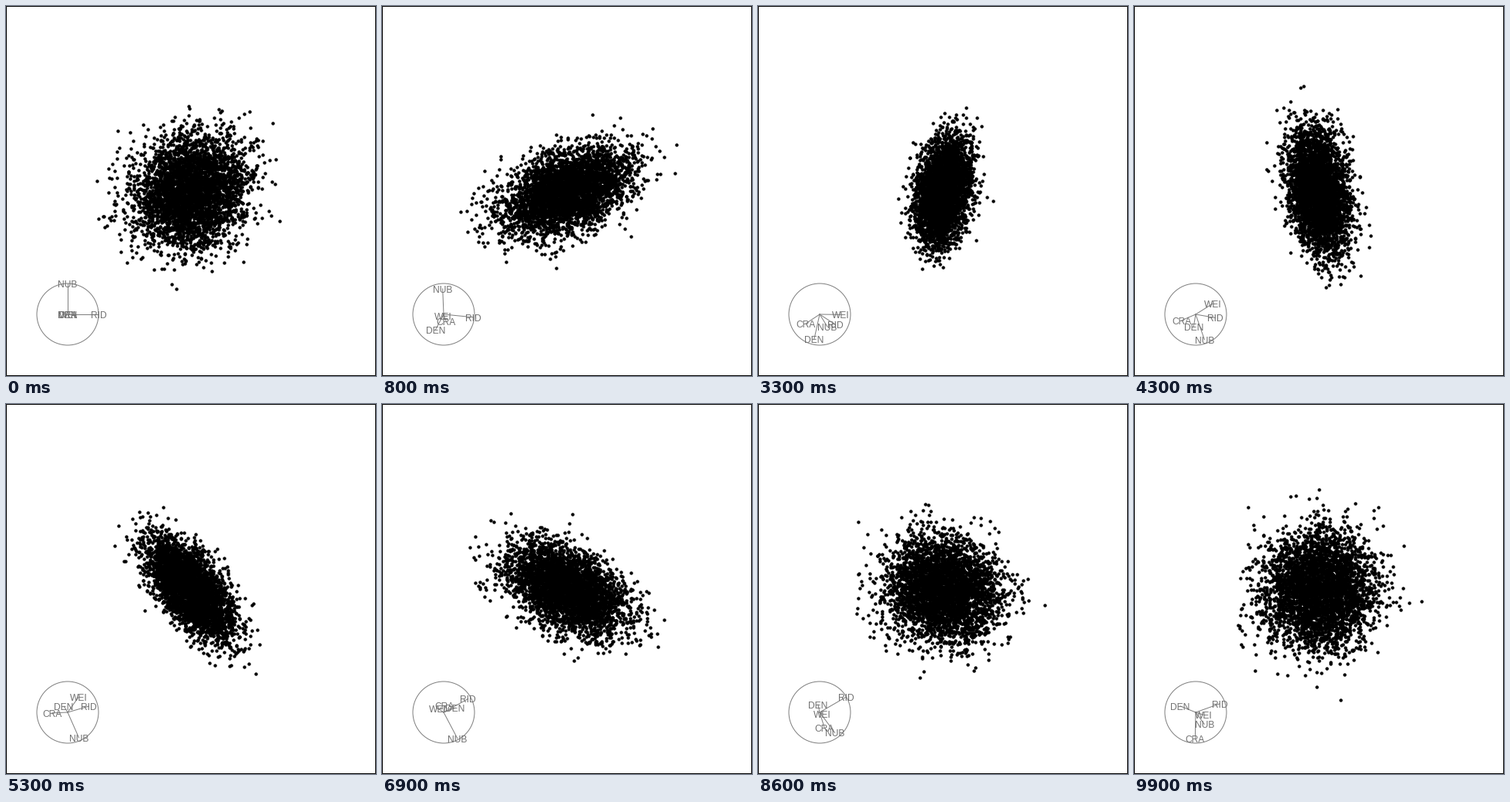
A matplotlib script for the animation above (10 s loop, 480 px wide and 480 px high).

```python
import numpy as np
import matplotlib.pyplot as plt
from matplotlib.animation import FuncAnimation
from matplotlib.patches import Circle, Rectangle

SIZE, DPI = 480, 100
PX = 72 / DPI
FRAMES, INTERVAL = 100, 100
GREY, TEXT = "#7f7f7f", "#707070"
POINTS, SPREAD = 3848, 36.5     # spread: pixels per standard deviation
HUB, RADIUS = np.array([80, 400]), 40
FLIP = np.array([1, -1])
NAMES = ["RID", "NUB", "CRA", "WEI", "DEN"]

# Planes the tour passes: step -> its horizontal and vertical axis
STOPS = {
    0: ([1, 0, 0, 0, 0], [0, 1, 0, 0, 0]),
    17: ([.83, -.22, .18, -.02, -.5], [-.3, .32, -.4, -.08, -.8]),
    33: ([.5, .25, -.45, .68, -.19], [-.32, -.4, -.3, 0, -.8]),
    53: ([.68, .36, -.5, .35, -.12], [.2, -.83, -.02, .5, .2]),
    69: ([.8, .44, .02, -.18, .38], [.45, -.85, .22, .12, .15]),
    86: ([.85, .48, .15, .08, -.05], [.5, -.65, -.5, -.05, .25]),
    99: ([.78, .28, -.02, .25, -.5], [.28, -.38, -.85, -.08, .2]),
}


def make_data():
    """Correlated cloud with a slightly flat centre and short tails."""
    corr = np.eye(5)
    upper = np.triu_indices(5, 1)
    corr[upper] = [-.9 if pair == (0, 3) else 0 for pair in zip(*upper)]
    corr[0, [1, 2, 4]] = .13, -.13, -.57
    corr[1, 2:] = .08, -.17, .33
    corr[2, 3:] = .27, -.15
    corr[3, 4] = .24
    corr += np.triu(corr, 1).T
    z = np.random.default_rng(7).standard_normal((POINTS, 5))
    z *= (np.linalg.norm(z, axis=1, keepdims=True) / np.sqrt(5)) ** -0.1
    return z @ np.linalg.cholesky(corr).T


def orthonormal(pair):
    u, _, vt = np.linalg.svd(np.array(pair, float).T, full_matrices=False)
    return u @ vt


def geodesic(a, b, t):
    """Rotate plane a into plane b, with an even spin inside the plane."""
    u, cos, wt = np.linalg.svd(a.T @ b)
    cos = np.clip(cos, -1, 1)
    tau = np.arccos(cos)
    start, end = a @ u, b @ wt.T
    side = end - start * cos
    side /= np.maximum(np.linalg.norm(side, axis=0), 1e-9)
    plane = start * np.cos(t * tau) + side * np.sin(t * tau)
    turn = u @ wt
    spin = t * np.arctan2(turn[1, 0], turn[0, 0])
    c, s = np.cos(spin), np.sin(spin)
    return plane @ u.T @ np.array([[c, -s], [s, c]])


steps = list(STOPS)
planes = [orthonormal(pair) for pair in STOPS.values()]
data = make_data()


def basis(i):
    k = min(np.searchsorted(steps, i, side="right") - 1, len(steps) - 2)
    t = (i - steps[k]) / (steps[k + 1] - steps[k])
    return geodesic(planes[k], planes[k + 1], t)


fig = plt.figure(figsize=(SIZE / DPI, SIZE / DPI), dpi=DPI, facecolor="white")
ax = fig.add_axes([0, 0, 1, 1])
ax.set(xlim=(0, SIZE), ylim=(SIZE, 0))
ax.axis("off")

ax.add_patch(Rectangle((.5, .5), SIZE - 1, SIZE - 1, fill=False, ec="black",
                       lw=PX, snap=False, clip_on=False))
ax.add_patch(Circle(HUB, RADIUS, fill=False, ec=GREY, lw=PX))
spokes = [ax.plot([], [], color=GREY, lw=PX)[0] for _ in NAMES]
labels = [ax.text(0, 0, name, color=TEXT, family="Liberation Sans",
                  size=12 * PX, ha="center", va="baseline") for name in NAMES]
dots, = ax.plot([], [], "o", color="black", ms=4.4 * PX, mew=0)


def draw(i):
    plane = basis(i)
    dots.set_data(*(SIZE / 2 + SPREAD * data @ plane * FLIP).T)
    tips = HUB + RADIUS * plane * FLIP
    for spoke, label, (x, y) in zip(spokes, labels, tips):
        spoke.set_data([HUB[0], x], [HUB[1], y])
        label.set_position((x, y + 5))
    return [dots, *spokes, *labels]


anim = FuncAnimation(fig, draw, frames=FRAMES, interval=INTERVAL,
                     repeat=True, repeat_delay=0)
plt.show()
```
